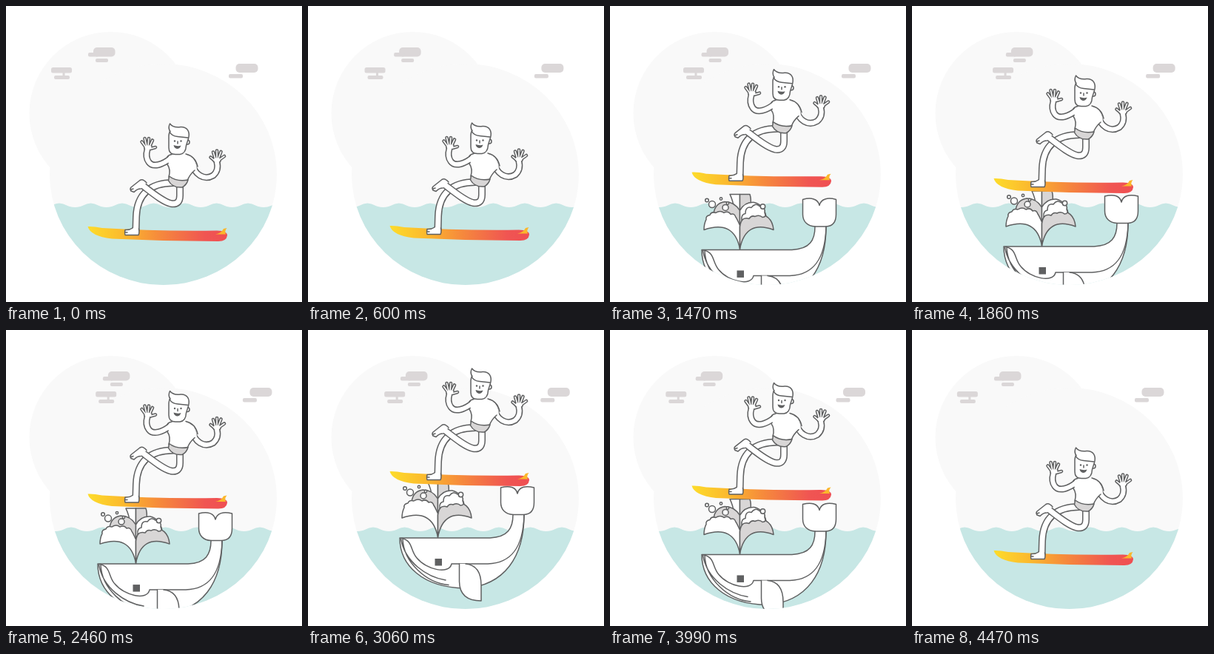
Recreate the animation shown at these times as an HTML page. Size 400 by 400 pixels, loop 4.5 s.

```html
<!DOCTYPE html>
<html lang="en">
<head>
<meta charset="utf-8">
<title>Surfer on a whale</title>
<style>
  html, body { margin: 0; height: 100%; overflow: hidden; background: #fff; }
  svg { display: block; width: 100%; height: 100%; }
  .ink { fill: #fff; stroke: #5f6061; stroke-width: 1.5; stroke-linejoin: round; stroke-linecap: round; }
  .line { fill: none; }
  .gray { fill: #d8d6d6; }
  .dark { fill: #5f6061; stroke: none; }
  .bare { stroke: none; }
  .limb { fill: none; stroke-linejoin: round; stroke-linecap: round; }
  .cloud { fill: #dbd7d8; }
</style>
</head>
<body>
<svg viewBox="0 0 400 400">
  <defs>
    <clipPath id="pond"><ellipse cx="212.5" cy="227.5" rx="153.5" ry="149.5"/></clipPath>
    <linearGradient id="paint">
      <stop offset="0" stop-color="#fddc2b"/>
      <stop offset=".27" stop-color="#fbb72e"/>
      <stop offset=".5" stop-color="#f68c3b"/>
      <stop offset=".84" stop-color="#f05552"/>
      <stop offset="1" stop-color="#ef4f53"/>
    </linearGradient>
  </defs>

  <g fill="#f9f9f9">
    <circle cx="141.5" cy="145" r="110"/>
    <ellipse cx="212.5" cy="227.5" rx="153.5" ry="149.5"/>
  </g>

  <g class="cloud" id="cloudA">
    <rect x="61" y="83" width="28" height="7.5" rx="2.5"/>
    <rect x="76.5" y="89" width="3" height="6"/>
    <rect x="65" y="94" width="21" height="5" rx="2"/>
  </g>
  <g class="cloud" id="cloudB">
    <rect x="118" y="56" width="29.5" height="12.5" rx="5"/>
    <rect x="111" y="63" width="14" height="5.5" rx="2"/>
    <rect x="121" y="71" width="17" height="5" rx="2"/>
  </g>
  <g class="cloud" id="cloudC">
    <rect x="310.5" y="78" width="30" height="12" rx="5"/>
    <rect x="301" y="92" width="19" height="5.5" rx="2"/>
  </g>

  <g clip-path="url(#pond)">
    <path id="water" fill="#c7e7e5"/>
    <g id="whale" class="ink">
      <g id="spout">
        <path d="M162 206H175.500V256H170Q170 222 162 206Z"/>
        <path class="gray" d="M175.500 206H189Q191 212 190 222L181 256H175.500Z"/>
        <path class="gray" d="M175.500 262V228Q168 216 155 216Q142 218 140 232L160 246Z"/>
        <path d="M175.500 262V228Q182 216 195 217Q208 220 211 236L190 246Z"/>
        <path d="M175.500 280V248Q172 240 170 237Q168 231 163 233Q160 228 154 231Q149 227 143 231Q137 229 135 234Q129 235 130 240Q127 246 127 254Q168 240 175.500 280Z"/>
        <path class="gray" d="M175.500 280V250Q177 234 196 232Q219 232 221 254Q183 240 175.500 280Z"/>
        <path d="M178 241Q177 233 183 232Q183 222 191 224Q196 217 202 222Q211 224 209 231Q212 237 206 237Q202 233 196 236Q191 234 188 239Q182 237 178 241Z"/>
        <circle cx="131" cy="214" r="2.300"/>
        <circle cx="138" cy="219.500" r="4.500"/>
        <circle cx="150" cy="212" r="1.700"/>
        <circle cx="159" cy="218" r="1.700"/>
        <circle cx="156" cy="224" r="4"/>
        <circle cx="206.500" cy="222.500" r="3.200"/>
      </g>
      <path d="M124 281H246C270 280 277 268 277 249.500C267 249 260.500 243 260.500 233V213C272 210 281 212 283 221C285 212 294 210 305.500 213V233C305.500 243 301 249 292 249.500C292 306 266 345 212 349C155 348 124 318 124 281Z"/>
      <path class="line" d="M277 249.500H292M194 316H243C274 315 291 295 292 249.500M127 281.500C142 285 138 298 147 308C160 324 191 331 194 316M128 282C129 314 160 342 190 344.500M125.500 282C131 314 161 334 186 338"/>
      <path d="M204.500 316V340Q205 366 234 366V345Q234 318 213 316"/>
      <rect class="dark" x="171.500" y="309" width="9.500" height="9.500"/>
    </g>
  </g>

  <g id="surfer">
    <path fill="url(#paint)" d="M110.500 298Q118 297.500 130 300Q200 304.500 285 303.500Q299 304 299 310Q298 318 287 318Q210 317.500 143 314.500Q114 311 110.500 298Z"/>
    <path fill="#fbb72b" d="M283 308.500Q291 307 294 301L298.500 300Q295 304 297 308.500Z"/>
    <g id="standingLeg"></g>
    <path class="ink" d="M179.500 301Q180.500 307 179 309.500H161Q160 307 161 302.500Q167 303 171 300"/>
    <g id="liftedLeg"></g>
    <path class="ink" d="M190 239Q185 233 181 235.500L169 245Q167 247 169 250L173 251.500Q177 247 182 247"/>
    <path class="line ink" d="M161 306H164M169 248L172 247"/>
    <g id="arms"></g>
    <path fill="#fff" d="M221 200Q231 204 243 200Q257 203 258 222Q250 222 245 235Q231 238 220 231Q224 220 218 208Z"/>
    <path class="line ink" d="M218 204Q220 201 224 200.500M218 214Q223 221 220 231M243 200Q256 203 259 217M255 222Q248 228 245 236"/>
    <path class="ink gray" d="M220.500 230Q231 238 246 235Q244 242 238 245Q225 246 219.500 236Z"/>
    <circle class="ink" cx="245" cy="184" r="3"/>
    <path class="ink" d="M220 175V191.500Q220 200.500 229 200.500H235Q243 199.500 243.500 188.500L246.500 179C249 170 245 163 236 163.500Q226 165 221.500 159Q218.500 165 222 169.500Q220 172 220 175Z"/>
    <path class="line ink" d="M221 170Q224 176 232 176.500L246 178M232 183V186"/>
    <circle class="dark" cx="228" cy="182.500" r="1.200"/>
    <circle class="dark" cx="236.500" cy="182.500" r="1.200"/>
    <path class="dark" d="M226.500 188Q232 190 236.500 188.500Q235 193 231 193Q227 192 226.500 188Z"/>
  </g>
</svg>
<script>
const LOOP = 4500, TURN = 2400;
const $ = id => document.getElementById(id);

// Outlined tubes: all dark strokes first, then white ones, so that joints merge.
function tubes(id, parts) {
  const pass = (color, inset) => parts.map(([width, d]) =>
    `<path class="limb" d="${d}" stroke="${color}" stroke-width="${width - inset}"/>`).join('');
  $(id).innerHTML = pass('#5f6061', 0) + pass('#fff', 3);
}
tubes('standingLeg', [[10, 'M226 239C195 239 177 254 176 285L175.5 303']]);
tubes('liftedLeg', [[10, 'M235 243V256Q235 269 223 267C211 264 196 251 184 242']]);
tubes('arms', [
  [9, 'M222 206C212 214 199 219 193 211Q188 204 191 194'],
  [9, 'M252 212C254 228 268 236 280 229Q288 222 285 211'],
  [8, 'M190 191L194 191M283 208L287 208'],
  [4.6, 'M189 191L183.5 183.500M190 190L187.500 179M192 189L193 179M194 190L198 181.500M195 193L202 191'],
  [4.6, 'M283 210L276.500 204.500M283 207L280 197.500M285 206L285 195.500M287 206L290.500 197M288 208L295 203'],
]);

// Eased interpolation through [time, value] keys.
function track(keys, t) {
  if (t <= keys[0][0]) return keys[0][1];
  for (let i = 1; i < keys.length; i++) {
    const [t0, a] = keys[i - 1], [t1, b] = keys[i];
    if (t < t1) return a + (b - a) * (1 - Math.cos(Math.PI * (t - t0) / (t1 - t0))) / 2;
  }
  return keys[keys.length - 1][1];
}

const whaleKeys = [[860, 220], [1540, 44], [2360, 44], [2700, 0], [3860, 0], [4430, 180]];
const surferKeys = [[0, 0], [1200, -2], [1580, -90], [1860, -65], [2120, -78], [2400, -70],
  [2700, -136], [3060, -107], [3430, -124], [3620, -114], [3810, -125], [4300, 0]];
const waterKeys = [[0, 0], [1170, 16], [3900, 16], [4500, -1]];

function waterPath(shift) {
  const step = 42.5;
  let x = 72 - 2 * step + shift, d = `M${x} 266.5`;
  for (; x < 400; x += step) {
    d += `C${x + 8} 267 ${x + 12} 272 ${x + step / 2} 272S${x + step - 8} 267 ${x + step} 266.5`;
  }
  return d + 'V400H-60Z';
}

const move = (id, x, y) => $(id).setAttribute('transform', `translate(${x} ${y})`);

function draw(now) {
  const t = now % LOOP;
  const drift = t < TURN ? t / TURN : 1 - 1.016 * (t - TURN) / (LOOP - TURN);
  move('cloudA', 62 * drift, 0);
  move('cloudB', 20.5 * drift, 0);
  move('cloudC', 19.5 * drift, 0);
  $('water').setAttribute('d', waterPath(track(waterKeys, t)));
  move('whale', 0, track(whaleKeys, t));
  move('surfer', 0, track(surferKeys, t));
  requestAnimationFrame(() => draw(performance.now() - start));
}
const start = performance.now();
draw(0);
</script>
</body>
</html>
```
